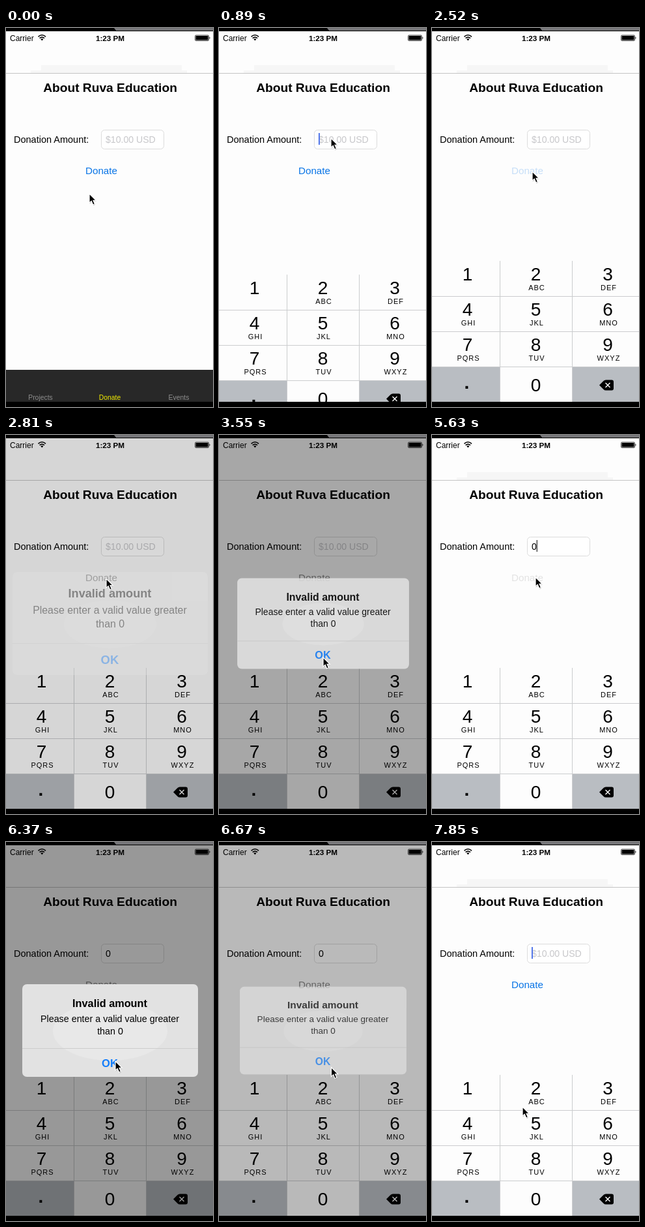
Write an HTML page that moves like this. It is 318 px wide and 581 px high and loops after 8 s.

```html
<!DOCTYPE html>
<html lang="en">
<head>
<meta charset="utf-8">
<title>Donation form</title>
<style>
  html, body { margin: 0; width: 100%; height: 100%; overflow: hidden; background: #000; }
  svg { display: block; width: 100%; height: 100%; }
  text { font-family: "Liberation Sans", Arial, sans-serif; }
  .mid { text-anchor: middle; }
  .bold { font-weight: bold; }
  .tab { font-size: 10.4px; fill: #8e8e8e; text-anchor: middle; }
  .digit { font-size: 28px; text-anchor: middle; }
  .letters { font-size: 11px; letter-spacing: 1px; text-anchor: middle; }
</style>
</head>
<body>
<svg viewBox="0 0 318 581">
  <defs>
    <clipPath id="screen"><rect y="5" width="318" height="568"/></clipPath>
  </defs>
  <rect width="318" height="581"/>
  <path d="M166 0H318V4H169Z" fill="#757578"/>

  <g clip-path="url(#screen)">
    <rect y="5" width="318" height="568" fill="#fdfdfd"/>
    <path id="navShade" d="M54 57H270V65H278V69H38V65H54Z" fill="#f6f6f6"/>
    <path d="M0 69.5H318" stroke="#c4c4c4"/>

    <text x="6" y="19.5" font-size="12">Carrier</text>
    <g fill="none" stroke="#000" stroke-width="1.6">
      <path d="M49.5 13.3Q55.2 8.2 61 13.3M51.6 15.7Q55.2 12.6 59 15.7"/>
      <path d="M53.2 17L55.3 19.5L57.4 17Q55.3 15.4 53.2 17Z" fill="#000" stroke="none"/>
    </g>
    <text class="mid bold" x="160" y="19.5" font-size="11.7">1:23 PM</text>
    <rect x="290.5" y="11" width="21" height="8.5" rx="1.5" fill="none" stroke="#000" stroke-width=".7"/>
    <rect x="291.5" y="12" width="19" height="6.5" rx=".5"/>
    <path d="M312.5 13.5Q314.5 15.2 312.5 17Z"/>

    <text class="mid bold" x="160" y="98" font-size="19.2">About Ruva Education</text>
    <text x="12" y="176" font-size="14.5">Donation Amount:</text>
    <rect x="146.5" y="156.5" width="96" height="29" rx="5" fill="#fff" stroke="#dcdcdc"/>
    <text id="placeholder" x="153" y="176" font-size="14.1" fill="#c7c7ca">$10.00 USD</text>
    <text id="amount" x="153" y="176" font-size="14.1">0</text>
    <rect id="caret" y="161" width="1.8" height="18"/>
    <text id="donate" class="mid" x="146.5" y="223.5" font-size="15.2">Donate</text>

    <rect y="524" width="318" height="49" fill="#282828"/>
    <text class="tab" x="53" y="570">Projects</text>
    <text class="tab" x="159.5" y="570" style="fill:#f3ec00">Donate</text>
    <text class="tab" x="265.5" y="570">Events</text>

    <g id="keypad">
      <rect y="357" width="318" height="216" fill="#fdfdfd"/>
      <rect y="519" width="104" height="54" fill="#b9bdc2"/>
      <rect id="zeroKey" x="105" y="519" width="110" height="54"/>
      <rect id="deleteKey" x="215" y="519" width="103" height="54"/>
      <path d="M104.5 357V573M215.5 357V573M0 411.5H318M0 465.5H318M0 519.5H318" stroke="#cbccce"/>
      <g id="keys"></g>
      <text class="digit bold" x="53.5" y="553">.</text>
      <text class="digit" x="159.5" y="557">0</text>
      <path d="M257 547.5L263.5 541Q265 539.5 267 539.5H276Q279 539.5 279 542.5V552.5Q279 555.5 276 555.5H267Q265 555.5 263.5 554Z"/>
      <path d="M266.5 544L273.5 551M273.5 544L266.5 551" stroke="#fff" stroke-width="1.4"/>
    </g>

    <rect id="dim" y="5" width="318" height="568"/>
    <g id="alert">
      <rect x="25" y="218" width="270" height="142" rx="7" fill="#e2e2e2"/>
      <ellipse id="glow" cx="160" cy="290" ry="45" fill="#e8e8e8"/>
      <path id="okPress" d="M25 317H295V353Q295 360 288 360H32Q25 360 25 353Z" fill="#cfcfcf"/>
      <path d="M25 316.5H295" stroke="#cdcdcd"/>
      <text class="mid bold" x="159.5" y="253" font-size="16.3">Invalid amount</text>
      <text class="mid" x="159.5" y="275.5" font-size="14.3">Please enter a valid value greater</text>
      <text class="mid" x="160" y="294.5" font-size="14.3">than 0</text>
      <text class="mid bold" x="159.5" y="344.5" font-size="16.6" fill="#147efb">OK</text>
    </g>
  </g>

  <g id="cursor">
    <path d="M0 0V14.2L3.2 11.3L5.7 17L8.4 15.8L6 10.4H10.3Z" transform="translate(.6 1.2)" opacity=".25"/>
    <path d="M0 0V14.2L3.2 11.3L5.7 17L8.4 15.8L6 10.4H10.3Z" stroke="#fff" stroke-width="1.2"/>
  </g>
</svg>
<script>
const LOOP = 8000, STEPS = 54;
const el = id => document.getElementById(id);
const set = (id, attrs) => {
  for (const name in attrs) el(id).setAttribute(name, attrs[name]);
};
const show = (id, visible) => set(id, { visibility: visible ? "visible" : "hidden" });
const within = (t, ...ranges) => ranges.some(([from, to]) => t >= from && t < to);
const smooth = p => p * p * (3 - 2 * p);

// Keyframes are [time, ...values]; values between them are eased.
function sample(frames, t, ease = p => p) {
  const next = frames.findIndex(frame => frame[0] > t);
  if (next < 0) return frames[frames.length - 1].slice(1);
  if (next === 0) return frames[0].slice(1);
  const a = frames[next - 1], b = frames[next];
  const p = ease((t - a[0]) / (b[0] - a[0]));
  return a.slice(1).map((value, i) => value + (b[i + 1] - value) * p);
}

const cursorPath = [
  [0, 128, 254], [440, 172, 169], [1190, 172, 169], [1930, 154, 220],
  [2800, 154, 220], [3390, 160, 341], [3600, 160, 341], [4300, 164, 557],
  [4600, 164, 557], [5330, 159, 218], [5780, 159, 218], [6360, 168, 336],
  [6580, 168, 336], [7260, 268, 548], [7560, 268, 548], [7850, 139, 406]
];
// Alert opacity and scale: shrinks into place, shrinks further on leaving.
const alertPath = [
  [2670, 0, 1.18], [3050, 1, 1], [3490, 1, 1], [3950, 0, .84],
  [5640, 0, 1.18], [6010, 1, 1], [6530, 1, 1], [6950, 0, .84]
];
const caretStarts = [740, 3950, 4440, 6950, 7400];

const letters = ["", "ABC", "DEF", "GHI", "JKL", "MNO", "PQRS", "TUV", "WXYZ"];
el("keys").innerHTML = letters.map((label, i) => {
  const x = [54.5, 159.5, 270][i % 3], y = 357 + 54 * Math.floor(i / 3);
  return `<text class="digit" x="${x}" y="${y + 30}">${i + 1}</text>` +
    `<text class="letters" x="${x + 1.5}" y="${y + 45}">${label}</text>`;
}).join("");

function draw(t) {
  const [x, y] = sample(cursorPath, t, smooth);
  set("cursor", { transform: `translate(${x} ${y})` });

  const rise = Math.min(1, Math.max(0, (t - 700) / 350));
  set("keypad", { transform: `translate(0 ${216 * (1 - rise) ** 3})` });
  set("zeroKey", { fill: within(t, [4440, 4585]) ? "#b9bdc2" : "#fdfdfd" });
  set("deleteKey", { fill: within(t, [7400, 7690]) ? "#fdfdfd" : "#b9bdc2" });

  const typed = within(t, [4440, 7400]);
  const inactive = within(t, [2660, 3950], [5620, 6950]);
  show("amount", typed);
  show("placeholder", !typed);
  set("donate", {
    fill: inactive ? "#888" : "#0874e6",
    opacity: within(t, [2360, 2810], [5480, 5770]) ? .22 : 1
  });

  const [fade, scale] = sample(alertPath, t);
  const caretStart = caretStarts.filter(start => start <= t).pop();
  show("caret", caretStart !== undefined && (t - caretStart) % 1000 < 500 && fade === 0);
  set("caret", { x: typed ? 160.4 : 153, fill: inactive ? "#666" : "#4169e8" });

  show("navShade", fade === 0);
  set("dim", { opacity: .4 * fade });
  set("alert", {
    opacity: fade,
    transform: `translate(160 289) scale(${scale}) translate(-160 -289)`
  });
  set("glow", { rx: fade < 1 ? 64 : 88, ry: fade < 1 ? 33 : 45 });
  show("okPress", within(t, [3400, 3500], [6500, 6530]));
}

function tick(now) {
  const step = Math.floor((now % LOOP) * STEPS / LOOP + .05) % STEPS;
  draw(step * LOOP / STEPS);
  requestAnimationFrame(tick);
}
draw(0);
requestAnimationFrame(tick);
</script>
</body>
</html>
```
